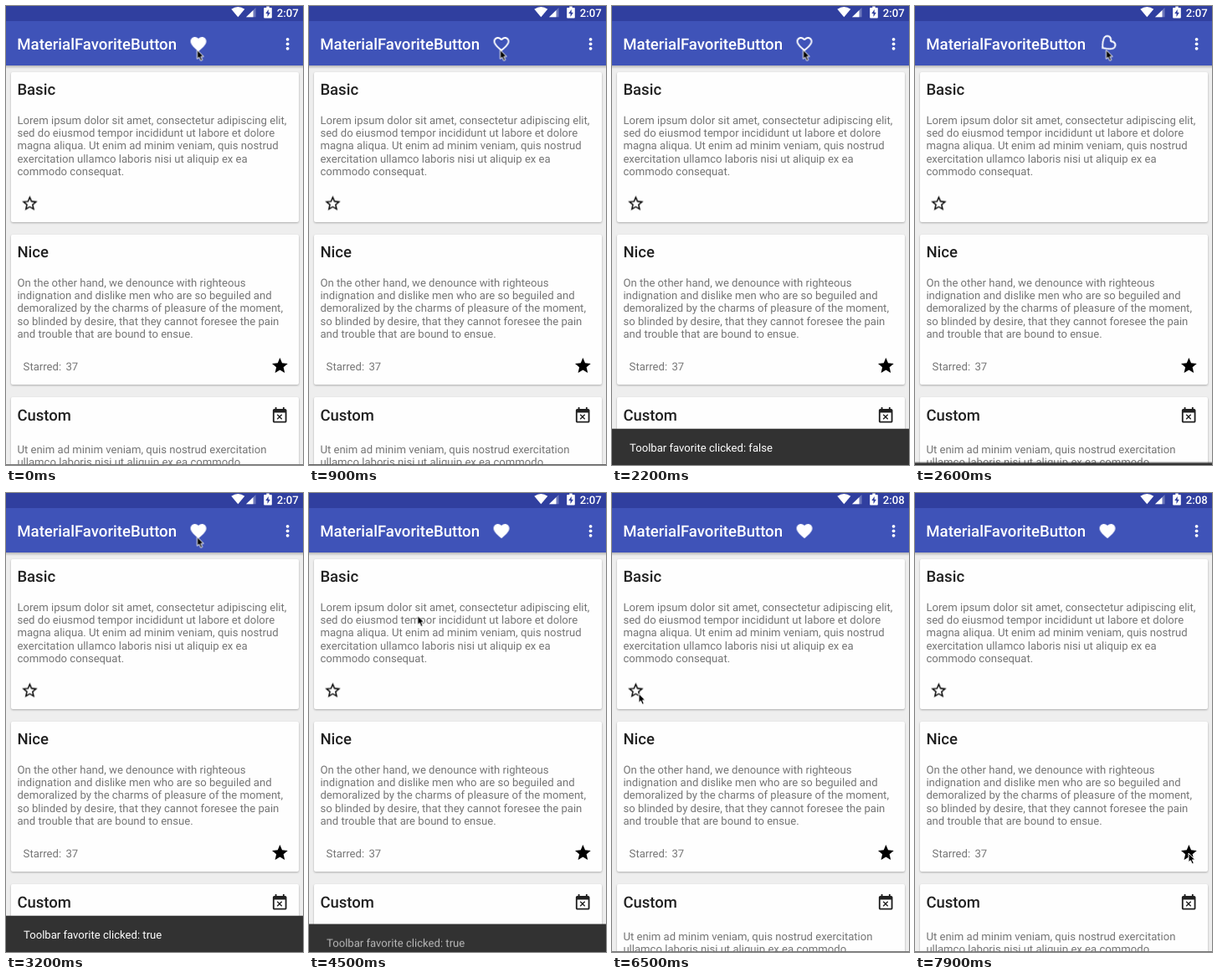
Write an HTML page that moves like this. It is 355x548 px and loops after 8000 ms.

```html
<!DOCTYPE html>
<html lang="en">
<head>
<meta charset="utf-8">
<title>MaterialFavoriteButton</title>
<style>
html, body { margin: 0; width: 100%; height: 100%; overflow: hidden; background: #eee; }
svg { display: block; width: 355px; height: 548px; font: 13.12px Roboto, sans-serif; text-rendering: geometricPrecision; }
.head { font-size: 18.5px; font-weight: 500; fill: #212121; }
.body { fill: #757575; }
.card { fill: #fefefe; filter: drop-shadow(0 1px 1px rgba(0,0,0,.28)); }
.white { fill: #fff; }
.title { font-size: 18.6px; font-weight: 500; }
.clock { font-size: 13.2px; font-weight: 500; }

/* one loop is 8 s, so 1% = 80 ms */
.spin, .pop, .on, .off, .bar, .msg, .then, .next, #cursor { animation: 8s linear infinite; }
.spin, .pop { transform-origin: 0 0; }

.heart .spin { animation-name: heart-spin; }
.heart .pop { animation-name: heart-pop; }
.heart .on { animation-name: heart-on; }
.heart .off { animation-name: heart-off; }
.star .spin { animation-name: star-spin; }
.star .pop { animation-name: star-pop; }
.star .on { animation-name: star-on; }
.star .off { animation-name: star-off; }
.on, .off, .then, .next { animation-timing-function: step-end !important; }

@keyframes heart-spin {
  0% { rotate: 0deg; }
  30.625% { rotate: 0deg; animation-timing-function: cubic-bezier(.333,0,.667,.333); }
  35.625%, 100% { rotate: 360deg; }
}
@keyframes heart-pop {
  0%, 35.62% { scale: 1; }
  35.625% { scale: .2; animation-timing-function: cubic-bezier(.333,1.667,.667,1); }
  39.375%, 100% { scale: 1; }
}
@keyframes heart-on { 0%, 35.625%, 100% { opacity: 1; } 11% { opacity: 0; } }
@keyframes heart-off { 0%, 35.625%, 100% { opacity: 0; } 11% { opacity: 1; } }

@keyframes star-spin {
  0% { rotate: 0deg; }
  61.69% { rotate: 0deg; animation-timing-function: cubic-bezier(.333,0,.667,.333); }
  65.44%, 100% { rotate: 360deg; }
}
@keyframes star-pop {
  0%, 65.435% { scale: 1; }
  65.44% { scale: .2; animation-timing-function: cubic-bezier(.333,1.667,.667,1); }
  69.19%, 100% { scale: 1; }
}
@keyframes star-on { 0%, 75%, 100% { opacity: 0; } 65.44% { opacity: 1; } }
@keyframes star-off { 0%, 75%, 100% { opacity: 1; } 65.44% { opacity: 0; } }

.bar { animation-name: bar; animation-timing-function: cubic-bezier(.4,0,.2,1); }
@keyframes bar {
  0%, 11%, 33.56%, 33.6%, 58.625%, 100% { transform: translateY(44px); }
  14.125%, 30.44%, 36.75%, 55.5% { transform: translateY(0); }
}
.msg { animation-name: msg; }
@keyframes msg {
  0%, 11.875%, 32.69%, 34.5%, 57.75%, 100% { opacity: 0; }
  14.125%, 30.44%, 36.75%, 55.5% { opacity: 1; }
}
.bar .then { animation-name: false-text; }
.bar .next { animation-name: true-text; }
@keyframes false-text { 0% { opacity: 1; } 33.58%, 100% { opacity: 0; } }
@keyframes true-text { 0% { opacity: 0; } 33.58%, 100% { opacity: 1; } }

.clock .then { animation-name: old-minute; }
.clock .next { animation-name: new-minute; }
@keyframes old-minute { 0% { opacity: 1; } 77.5%, 100% { opacity: 0; } }
@keyframes new-minute { 0% { opacity: 0; } 77.5%, 100% { opacity: 1; } }

#cursor { animation-name: move; animation-timing-function: ease-in-out; }
@keyframes move {
  0%, 51.875% { transform: translate(228.5px, 52.5px); }
  60.625%, 86.25% { transform: translate(32px, 239.5px); }
  96.25%, 100% { transform: translate(327px, 430px); }
}
</style>
</head>
<body>
<svg viewBox="0 0 355 548">
  <defs>
    <path id="heart" d="M12 21.35l-1.45-1.32C5.4 15.36 2 12.28 2 8.5 2 5.42 4.42 3 7.5 3c1.74 0 3.41.81 4.5 2.09C13.09 3.81 14.76 3 16.5 3 19.58 3 22 5.42 22 8.5c0 3.78-3.4 6.86-8.55 11.54z" transform="translate(-12 -12)"/>
    <path id="heart-line" d="M16.5 3c-1.74 0-3.41.81-4.5 2.09C10.91 3.81 9.24 3 7.5 3 4.42 3 2 5.42 2 8.5c0 3.78 3.4 6.86 8.55 11.54L12 21.35l1.45-1.32C18.6 15.36 22 12.28 22 8.5 22 5.42 19.58 3 16.5 3zm-4.4 15.55l-.1.1-.1-.1C7.14 14.24 4 11.39 4 8.5 4 6.5 5.5 5 7.5 5c1.54 0 3.04.99 3.57 2.36h1.87C13.46 5.99 14.96 5 16.5 5c2 0 3.5 1.5 3.5 3.5 0 2.89-3.14 5.74-7.9 10.05z" transform="translate(-12 -12)"/>
    <path id="star" d="M12 17.27L18.18 21l-1.64-7.03L22 9.24l-7.19-.61L12 2 9.19 8.63 2 9.24l5.46 4.73L5.82 21z" transform="translate(-12 -12)"/>
    <path id="star-line" d="M22 9.24l-7.19-.62L12 2 9.19 8.63 2 9.24l5.46 4.73L5.82 21 12 17.27 18.18 21l-1.63-7.03zM12 15.4l-3.76 2.27 1-4.28-3.32-2.88 4.38-.38L12 6.1l1.71 4.04 4.38.38-3.32 2.88 1 4.28z" transform="translate(-12 -12)"/>
    <linearGradient id="shade" x2="0" y2="1">
      <stop stop-opacity=".24"/>
      <stop offset="1" stop-opacity="0"/>
    </linearGradient>
  </defs>

  <rect width="355" height="548" fill="#eee"/>
  <rect y="71" width="355" height="4" fill="url(#shade)"/>
  <g class="card">
    <rect x="6" y="79" width="344" height="179" rx="2"/>
    <rect x="6" y="273" width="344" height="179" rx="2"/>
    <rect x="6" y="467" width="344" height="100" rx="2"/>
  </g>

  <rect width="355" height="18" fill="#303f9f"/>
  <rect y="18" width="355" height="53" fill="#3f53b8"/>

  <g class="white">
    <path d="M277.3 13.2L269.3 3.7Q277.3-1.9 285.3 3.7z"/>
    <path d="M287 13.2h11.5V2z" opacity=".3"/>
    <path d="M287 13.2h8.5V5z"/>
    <path fill-rule="evenodd" d="M309 2.1h2.3V.6h3.4v1.5h2.3q.8 0 .8.8v10.8q0 .8-.8.8h-8q-.8 0-.8-.8V2.9q0-.8.8-.8zM313.7 4.1l-3.4 5h2.2v3.8l3.4-5.2h-2.2z"/>
    <g class="clock">
      <text class="then" x="323.8" y="12.8">2:07</text>
      <text class="next" x="323.8" y="12.8">2:08</text>
    </g>
    <text class="title" x="13.3" y="52.3">MaterialFavoriteButton</text>
    <circle cx="336.6" cy="39.8" r="1.9"/>
    <circle cx="336.6" cy="45.3" r="1.9"/>
    <circle cx="336.6" cy="50.8" r="1.9"/>
    <g class="heart" transform="translate(230 45.4) scale(.94)">
      <g class="spin"><g class="pop">
        <use class="on" href="#heart"/>
        <use class="off" href="#heart-line"/>
      </g></g>
    </g>
  </g>

  <text class="head" x="13.4" y="106">Basic</text>
  <text class="body">
    <tspan x="13.4" y="140.5">Lorem ipsum dolor sit amet, consectetur adipiscing elit,</tspan>
    <tspan x="13.4" dy="15.4">sed do eiusmod tempor incididunt ut labore et dolore</tspan>
    <tspan x="13.4" dy="15.4">magna aliqua. Ut enim ad minim veniam, quis nostrud</tspan>
    <tspan x="13.4" dy="15.4">exercitation ullamco laboris nisi ut aliquip ex ea</tspan>
    <tspan x="13.4" dy="15.4">commodo consequat.</tspan>
  </text>
  <g class="star" transform="translate(28.4 235.7) scale(.925)">
    <g class="spin"><g class="pop">
      <use class="on" href="#star"/>
      <use class="off" href="#star-line"/>
    </g></g>
  </g>

  <text class="head" x="13.4" y="300.2">Nice</text>
  <text class="body">
    <tspan x="13.4" y="334.6">On the other hand, we denounce with righteous</tspan>
    <tspan x="13.4" dy="15.4">indignation and dislike men who are so beguiled and</tspan>
    <tspan x="13.4" dy="15.4">demoralized by the charms of pleasure of the moment,</tspan>
    <tspan x="13.4" dy="15.4">so blinded by desire, that they cannot foresee the pain</tspan>
    <tspan x="13.4" dy="15.4">and trouble that are bound to ensue.</tspan>
    <tspan x="20.6" y="435.2">Starred:</tspan>
    <tspan x="71.5">37</tspan>
  </text>
  <use href="#star" transform="translate(327.4 429.5) scale(.94)"/>

  <text class="head" x="13.4" y="494.6">Custom</text>
  <path fill="#212121" transform="translate(316.1 478.1) scale(.925)" d="M9.31 17l2.44-2.44L14.19 17l1.06-1.06-2.44-2.44 2.44-2.44L14.19 10l-2.44 2.44L9.31 10l-1.06 1.06 2.44 2.44-2.44 2.44zM19 3h-1V1h-2v2H8V1H6v2H5c-1.11 0-1.99.9-1.99 2L3 19c0 1.1.89 2 2 2h14c1.1 0 2-.9 2-2V5c0-1.1-.9-2-2-2zm0 16H5V8h14z"/>
  <text class="body">
    <tspan x="13.4" y="533.8">Ut enim ad minim veniam, quis nostrud exercitation</tspan>
    <tspan x="13.4" dy="15.4">ullamco laboris nisi ut aliquip ex ea commodo</tspan>
  </text>
  <rect y="547" width="355" height="1" fill="#777"/>

  <g class="bar">
    <rect y="504.7" width="355" height="44" fill="#323232"/>
    <g class="msg white">
      <text class="then" x="21" y="531.6">Toolbar favorite clicked: false</text>
      <text class="next" x="21" y="531.6">Toolbar favorite clicked: true</text>
    </g>
  </g>

  <g id="cursor">
    <path d="M0 0v10.8l2.4-2.1 1.8 4.1 2.1-.9L4.5 7.9h3.3z" stroke="#fff"/>
  </g>
</svg>
</body>
</html>
```
